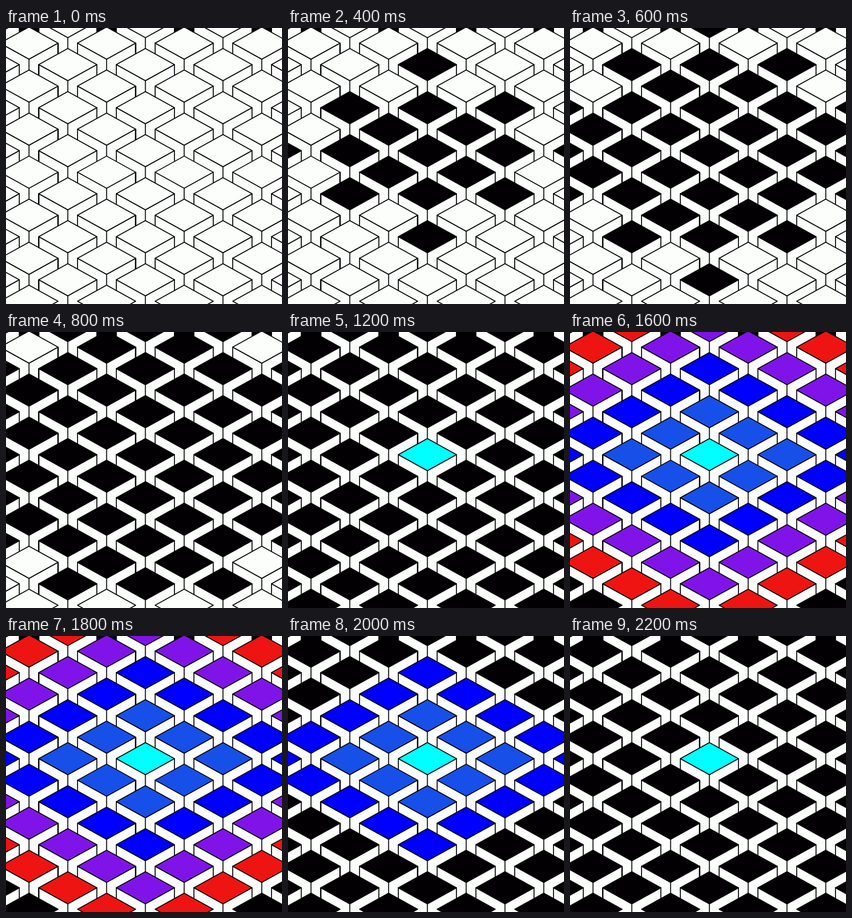
Write an HTML page that moves like this. It is 498 px wide and 498 px high and loops after 2300 ms.

```html
<!DOCTYPE html>
<html lang="en">
<head>
<meta charset="utf-8">
<title>Isometric tiles</title>
<style>
  html, body { margin: 0; width: 100%; height: 100%; overflow: hidden; background: #020003; }
  svg { display: block; width: 100vw; height: 100vh; }
  path { stroke: #020003; stroke-width: 1.7; stroke-linejoin: round; }
</style>
</head>
<body>
<svg id="stage" viewBox="0 0 498 498"></svg>
<script>
const STEP = 100, STEPS = 23;
const CX = 251.5, CY = 221.3, DX = 70, DY = 38.82;
const HALF_W = 52.4, HALF_H = 29, DEPTH = 44;
const FIRST_ROW = -6, LAST_ROW = 7;
const WHITE = '#fcfefc', BLACK = '#020003';
const RING_COLORS = ['#00ffff', '#1650e8', '#0000ff', '#8014e8', '#ee1412', '#f08014'];
const HEAVY_EDGES = [59, 94, 234];

const stage = document.getElementById('stage');
const tiles = [];

function addPath(d, fill, width) {
  const path = document.createElementNS('http://www.w3.org/2000/svg', 'path');
  path.setAttribute('d', d);
  path.setAttribute('fill', fill);
  if (width) path.style.strokeWidth = width;
  stage.append(path);
  return path;
}

function addSides(x, y) {
  const l = x - HALF_W, r = x + HALF_W, b = y + HALF_H;
  addPath(`M${l} ${y}L${x} ${b}L${r} ${y}v${DEPTH}L${x} ${b + DEPTH}L${l} ${y + DEPTH}Z`, WHITE);
  addPath(`M${x} ${b}v${DEPTH}`, 'none');
  for (const edge of [l, r]) {
    if (HEAVY_EDGES.some(h => Math.abs(h - edge) < 2)) addPath(`M${edge} ${y}v${DEPTH}`, 'none', 2.5);
  }
}

// Rows go back to front so that nearer tiles cover the sides behind them.
for (let row = FIRST_ROW; row <= LAST_ROW; row++) {
  for (let col = -4; col <= 4; col++) {
    if ((row + col) % 2) continue;
    const x = CX + col * DX, y = CY + row * DY;
    if (row < LAST_ROW) addSides(x, y);
    const top = addPath(
      `M${x} ${y - HALF_H}L${x + HALF_W} ${y}L${x} ${y + HALF_H}L${x - HALF_W} ${y}Z`, WHITE);
    const u = (row + col) / 2, v = (row - col) / 2;
    const ring = Math.max(Math.abs(u), Math.abs(v));
    // Every second tile of a ring, corners included, turns black one step early.
    const late = ring === 0 || row % 2 !== 0;
    tiles.push({ top, ring, blackAt: 2 * ring + (late ? 1 : 0) });
  }
}

function tileColor(tile, step) {
  const reach = 5 - Math.abs(step - 17);
  if (tile.ring <= reach) return RING_COLORS[tile.ring];
  return step >= tile.blackAt ? BLACK : WHITE;
}

let shown = -1;
function draw(now) {
  const step = Math.floor(now / STEP) % STEPS;
  if (step !== shown) {
    for (const tile of tiles) tile.top.setAttribute('fill', tileColor(tile, step));
    shown = step;
  }
}

const start = performance.now();
function tick() {
  draw(performance.now() - start);
  requestAnimationFrame(tick);
}
tick();
</script>
</body>
</html>
```
